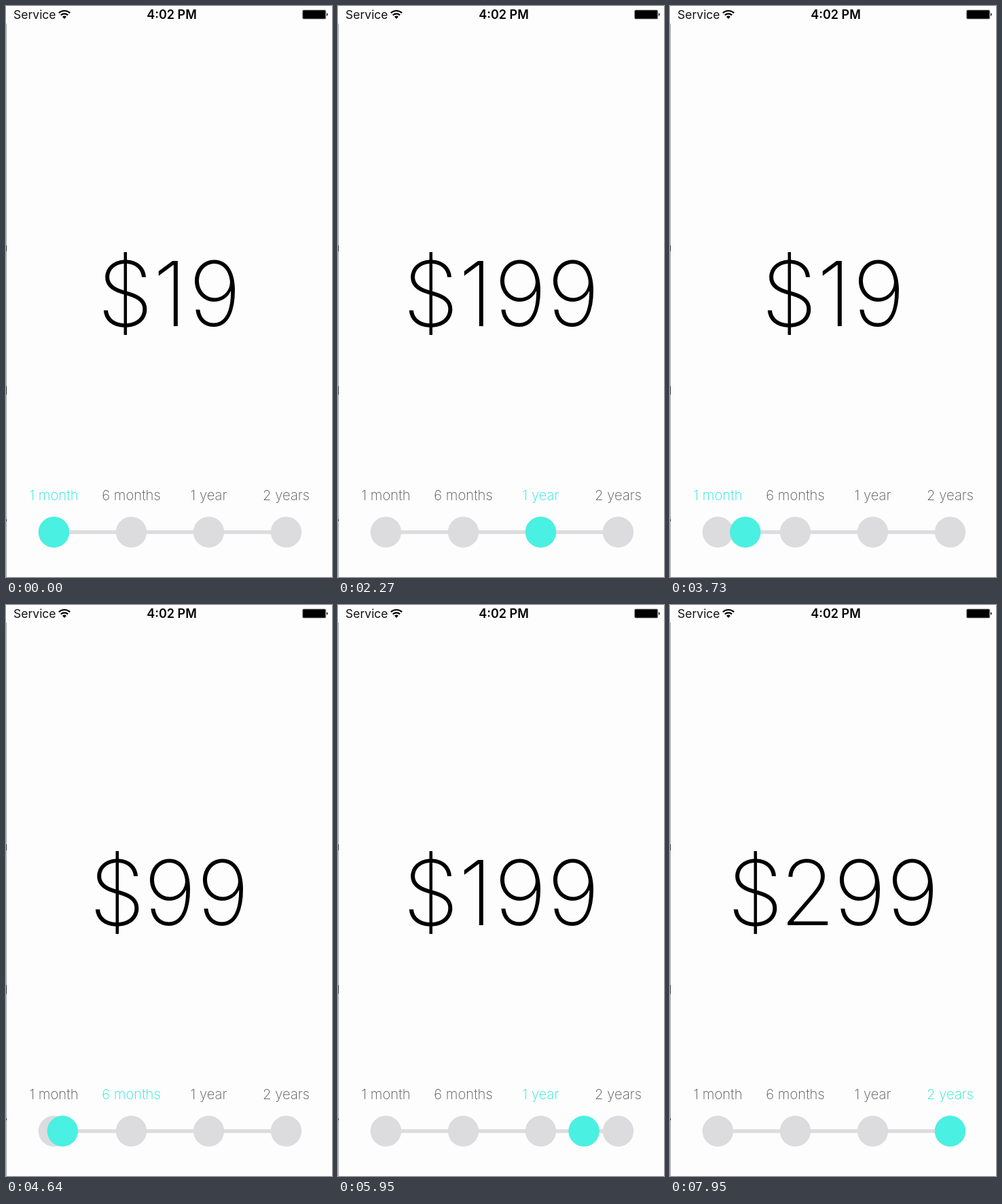
These frames come from a looping animation (480 by 840 pixels, 8000 ms). An HTML page:

```html
<!DOCTYPE html>
<html lang="en">
<head>
<meta charset="utf-8">
<title>Price slider</title>
<style>
  html, body { margin: 0; width: 100%; height: 100%; overflow: hidden; background: #fefdfe; }
  svg { display: block; width: 100%; height: 100%; }
  text { font-family: Inter, Roboto, sans-serif; text-anchor: middle; }
  .status { font-size: 17.5px; fill: #111; }
  .left { text-anchor: start; }
  .clock { font-size: 18px; font-weight: 600; fill: #000; }
  .price { font-size: 132px; font-weight: 200; fill: #000; }
  .label { font-size: 20.3px; font-weight: 200; fill: #555; }
  .label.on { fill: #22e8d8; }
  .track { stroke: #dcdbdd; stroke-width: 5.5; }
  .stop { fill: #dcdbdd; }
  .dot { fill: #4af0e1; }
</style>
</head>
<body>
<svg viewBox="0 0 480 840">
  <!-- window edge -->
  <path d="M.5 26V840" stroke="#a3a2a4"/>
  <path d="M.5 352v9M.5 559v13M.5 755v3" stroke="#333"/>

  <!-- status bar -->
  <text class="status left" x="11" y="19">Service</text>
  <g fill="none" stroke="#000" stroke-width="2.2">
    <path d="M77.8 10.3a11.8 11.8 0 0 1 16.4 0M80.8 13.5a7.4 7.4 0 0 1 10.4 0"/>
    <path d="M86 19l-3-3.2a4.4 4.4 0 0 1 6 0z" fill="#000" stroke="none"/>
  </g>
  <text class="clock" x="244" y="19">4:02 PM</text>
  <rect x="436.8" y="6" width="34" height="13" rx="1.5" fill="#000" stroke="#888" stroke-width=".8"/>
  <path d="M472 10.2q1.8 .6 1.8 2.3t-1.8 2.3z" fill="#222"/>

  <text class="price" id="price" y="471"></text>
  <path class="track" d="M70.5 774H412.5"/>
  <g id="stops"></g>
  <circle class="dot" id="dot" cy="774" r="22.7"/>
</svg>
<script>
  const LOOP = 8000, LEFT = 70.5, GAP = 114;
  const plans = [
    ["1 month", "$19"],
    ["6 months", "$99"],
    ["1 year", "$199"],
    ["2 years", "$299"]
  ];
  // [time, chosen plan]
  const taps = [
    [60, 1], [1290, 2], [2330, 3], [3173, 0], [4568, 1], [4935, 2],
    [5525, 3], [5805, 2], [6325, 0], [7060, 3]
  ];
  const advance = { $: 78, 1: 54, 2: 76, 9: 78 };

  const byId = id => document.getElementById(id);
  const price = byId("price"), dot = byId("dot"), stops = byId("stops");

  function add(tag, attrs, content = "") {
    const el = document.createElementNS("http://www.w3.org/2000/svg", tag);
    for (const key in attrs) el.setAttribute(key, attrs[key]);
    el.textContent = content;
    return stops.appendChild(el);
  }

  const labels = plans.map(([name], i) => {
    const x = LEFT + GAP * i;
    add("circle", { class: "stop", cx: x, cy: 774, r: 22.7 });
    return add("text", { class: "label", x, y: 727 }, name);
  });

  const smooth = t => t * t * (3 - 2 * t);

  // Each move starts wherever the previous one has got to.
  const moves = [];
  let last = { start: 0, from: 0, to: 0, span: 1 };
  const place = (m, time) =>
    m.from + (m.to - m.from) * smooth(Math.min(1, (time - m.start) / m.span));
  moves.push(last);
  for (const [start, to] of taps) {
    const span = 170 + 180 * Math.abs(to - last.to);
    last = { start, from: place(last, start), to, span };
    moves.push(last);
  }

  let shown = -1;
  function choose(index) {
    if (index === shown) return;
    shown = index;
    labels.forEach((el, i) => el.classList.toggle("on", i === index));
    const chars = [...plans[index][1]];
    let x = 241.5 - chars.reduce((sum, c) => sum + advance[c], 0) / 2;
    const centres = chars.map(c => (x += advance[c]) - advance[c] / 2);
    price.setAttribute("x", centres.join(" "));
    price.textContent = chars.join("");
  }

  function draw() {
    const time = performance.now() % LOOP;
    const move = moves.filter(m => m.start <= time).pop();
    dot.setAttribute("cx", LEFT + GAP * place(move, time));
    choose(move.to);
    requestAnimationFrame(draw);
  }
  draw();
</script>
</body>
</html>
```
